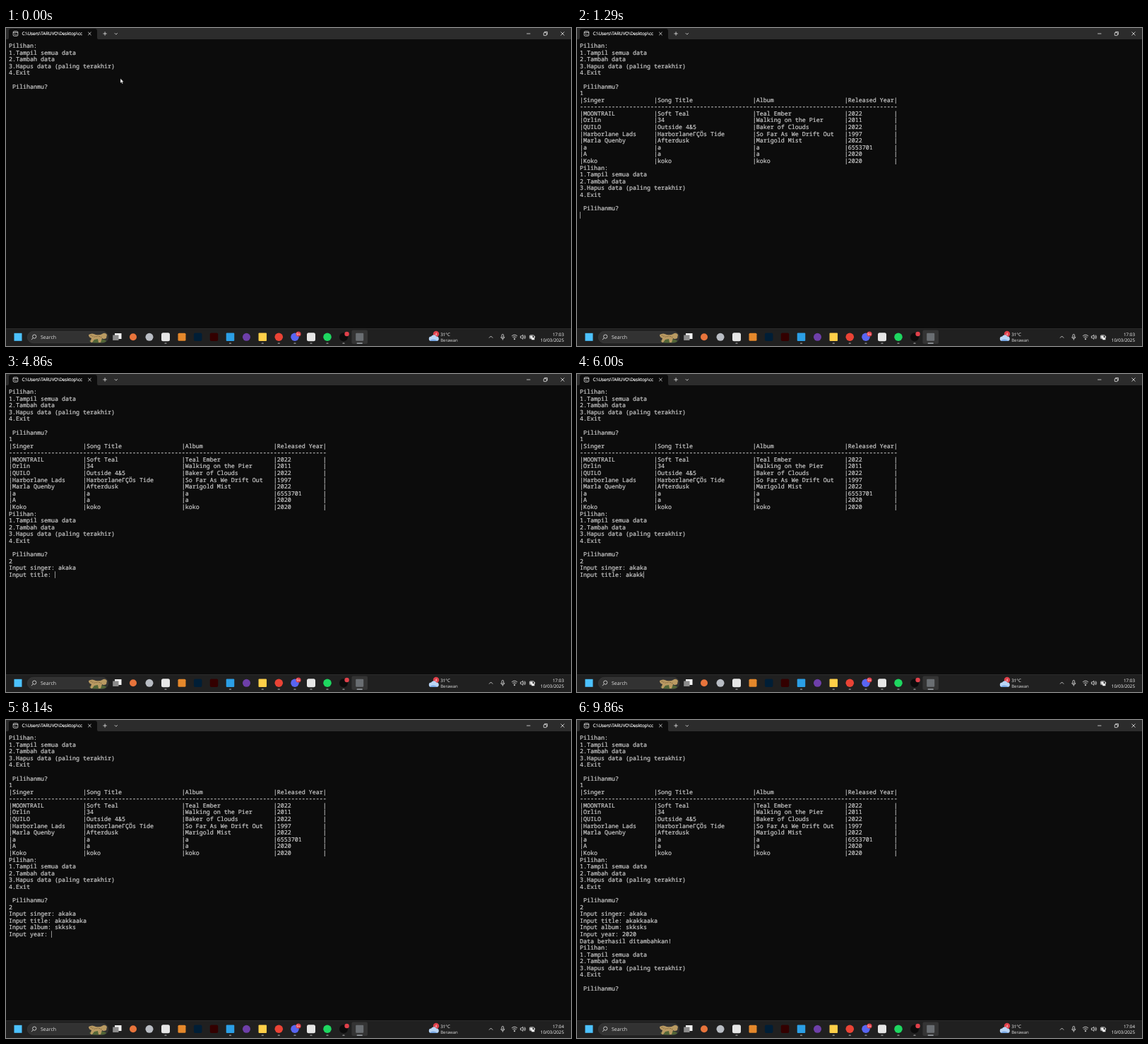
An HTML page that plays this animation: 800 by 450 pixels, repeating every 10000 ms.

```html
<!DOCTYPE html>
<html lang="id">
<head>
<meta charset="utf-8">
<title>Terminal</title>
<style>
  html, body { margin: 0; width: 100%; height: 100%; overflow: hidden; background: #0c0c0c; }
  svg { display: block; width: 800px; height: 450px; }
  text { white-space: pre; text-rendering: geometricPrecision; }
  #rows { font: 8.3333px "Noto Sans Mono", monospace; fill: #cccccc; stroke: #cccccc; stroke-width: .2; }
  .ui { font: 6.25px "Open Sans", "Noto Sans", sans-serif; fill: #fff; }
  .title { stroke: #fff; stroke-width: .15; }
  .line { fill: none; stroke: #fff; stroke-width: .7; }
</style>
</head>
<body>
<svg id="stage" viewBox="0 0 800 450">
  <defs>
    <clipPath id="tabClip"><rect x="20" width="89.3" height="16"/></clipPath>
    <clipPath id="photoClip"><rect x="116" y="429.5" width="28.5" height="16" rx="8"/></clipPath>
  </defs>
  <rect width="800" height="450" fill="#0c0c0c"/>

  <!-- Title bar -->
  <rect width="800" height="16" fill="#2c2c2c"/>
  <path d="M2 16q2 0 2-2V4q0-3 3-3H126q3 0 3 3V14q0 2 2 2z" fill="#0c0c0c"/>
  <rect class="line" x="10.2" y="4.7" width="6.6" height="6.6" rx="1.3"/>
  <path class="line" d="M10.2 6.4h6.6M12 8l1 .8-1 .8M13.8 9.7h1.6"/>
  <text class="ui title" x="22.5" y="10.3" clip-path="url(#tabClip)">C:\Users\TARUVO\Desktop\cc</text>
  <path class="line" d="M116.2 5.8l4.4 4.4m0-4.4l-4.4 4.4M137.4 8h5.4m-2.7-2.7v5.4M153.8 7.2l2 2 2-2
    M737.2 8h5.2M785.5 5.5l5 5m0-5l-5 5M762.6 6.2v-.8h3.8v3.8h-.8"/>
  <rect class="line" x="761.3" y="6.6" width="4" height="4" rx=".6"/>

  <g id="rows"></g>
  <rect id="caret" width=".7" height="9.6" fill="#ccc"/>
  <path id="pointer" d="M162 71.6v6.4l1.5-1.4 1 2.3 1.1-.5-1-2.2h2z" fill="#fff" stroke="#000" stroke-width=".3"/>

  <!-- Taskbar -->
  <rect y="425" width="800" height="25" fill="#202020"/>
  <rect y="425" width="800" height=".6" fill="#333"/>
  <rect x="30.3" y="429.3" width="114.4" height="16.4" rx="8.2" fill="#323232" stroke="#414141" stroke-width=".6"/>
  <circle class="line" cx="40.2" cy="436.6" r="2.6"/>
  <path class="line" d="M38.3 438.6l-2.3 2.6"/>
  <text class="ui" x="49" y="440" style="font-size:7px;fill:#ddd">Search</text>
  <g clip-path="url(#photoClip)">
    <ellipse cx="130" cy="443" rx="12" ry="3" fill="#526637"/>
    <path d="M117 434q5-3 10 0 6 1 9-1 4-3 7 1l-1 5q-4 2-6 0l-2 6h-3l-1-5-5 1-3 4h-3l2-6q-4-1-4-5z" fill="#b99a62"/>
    <path d="M120 435l5 2 6-1 5 2" fill="none" stroke="#6f5434" stroke-width="1.2" stroke-dasharray="1 1.5"/>
  </g>
  <rect x="154" y="432" width="9.5" height="8" fill="#f2f2f2"/>
  <rect x="151.2" y="434.5" width="8.3" height="7.5" fill="#8c8c8c"/>
  <rect x="489.5" y="427.5" width="22.5" height="19.5" rx="2" fill="#343434"/>
  <g id="icons"></g>
  <g id="badges" text-anchor="middle"></g>

  <!-- Weather and tray -->
  <path d="M602 443a3.2 3.2 0 0 1 0-6.4 4 4 0 0 1 7.3-.2 3.3 3.3 0 0 1 .4 6.6z" fill="#b9d5f5"/>
  <path d="M600 442.6q4-4 11 0l-1.5.4h-8z" fill="#79a8e4"/>
  <text class="ui" x="615.2" y="435.7">31°C</text>
  <text class="ui" x="615.2" y="443.8" style="font-size:6px;fill:#ddd">Berawan</text>
  <path class="line" d="M684 438.6l2.6-2.6 2.6 2.6"/>
  <rect class="line" x="702" y="433.4" width="2.6" height="4.8" rx="1.3"/>
  <path class="line" d="M700.7 437q.2 2.6 2.6 2.6t2.6-2.6M703.3 439.6v2"/>
  <path class="line" d="M716 436q4-3.6 8 0M717.4 437.7q2.6-2.3 5.2 0M718.8 439.3q1.2-1 2.4 0"/>
  <circle cx="720" cy="440.5" r=".8" fill="#fff"/>
  <path class="line" d="M728.4 436h1.5l2-1.8v6.2l-2-1.8h-1.5zM733.3 435.7q1.2 1.6 0 3.3M734.5 434.5q2.2 2.8 0 5.6"/>
  <rect class="line" x="741.4" y="434.8" width="6.4" height="4.8" rx="1"/>
  <path d="M742.2 435.6h3.5v3.2h-3.5zM748.2 436.3h.9v1.8h-.9zM744.3 438.2h4v3h-4z" fill="#fff"/>
  <text class="ui" id="clock" x="790" y="435.5" text-anchor="end"></text>
  <text class="ui" x="790" y="443.7" text-anchor="end">10/03/2025</text>
</svg>

<script>
const LOOP = 10000, BLINK = 570, CELL = 5, LINE = 9.58, LEFT = 4, TOP = 20.6;
const byId = id => document.getElementById(id);

function add(parent, tag, attrs, text = '') {
  const el = document.createElementNS('http://www.w3.org/2000/svg', tag);
  for (const key in attrs) el.setAttribute(key, attrs[key]);
  el.textContent = text;
  byId(parent).append(el);
  return el;
}

// Plain taskbar icons: [centre x, size, colour, corner radius, running]
[
  [17, 11, '#4cc2ff', 0], [180, 10, '#e8743b', 5], [203, 11, '#b9bdc4', 5.5],
  [226, 12, '#e6e6e6', 2.5, 1], [249, 11, '#e5882b', 1.5], [271.7, 11.5, '#001e36', 2],
  [294.5, 11.5, '#330000', 2], [317.5, 11.5, '#2b9fe6', 1, 1], [340.5, 11, '#6e3fa9', 5.5],
  [363.3, 11.5, '#ffcf48', 1, 1], [386.3, 11.5, '#ea4335', 5.75, 1], [409, 11.5, '#5865f2', 5.75, 1],
  [432, 12, '#e6e6e6', 2.5, 1], [455, 11.5, '#1ed760', 5.75, 1], [478, 12, '#0b0b0b', 6, 1],
  [500.7, 11, '#6a6e72', 1]
].forEach(([x, size, fill, rx, running]) => {
  add('icons', 'rect', { x: x - size / 2, y: 437.3 - size / 2, width: size, height: size, rx, fill });
  if (running) add('icons', 'rect', { x: x - 1.6, y: 445.6, width: 3.2, height: 1.2, rx: .6, fill: '#9a9a9a' });
});
add('icons', 'rect', { x: 496.5, y: 445.4, width: 8.4, height: 1.4, rx: .7, fill: '#b5bcc2' });

[[414, 3.6, '9+'], [482.6, 3.2, ''], [609, 4.2, '4']].forEach(([cx, r, label]) => {
  add('badges', 'circle', { cx, cy: 433, r, fill: '#e0404a' });
  add('badges', 'text', { class: 'ui', x: cx, y: 434.9, style: 'font-size:5px' }, label);
});

// Terminal session
const menu = `Pilihan:
1.Tampil semua data
2.Tambah data
3.Hapus data (paling terakhir)
4.Exit

 Pilihanmu?
`;
const widths = [20, 27, 25, 13];
const tableRow = cells => '|' + cells.split(',').map((cell, i) => cell.padEnd(widths[i]) + '|').join('') + '\n';
const table = tableRow('Singer,Song Title,Album,Released Year') + '-'.repeat(90) + '\n' + [
  'MOONTRAIL,Soft Teal,Teal Ember,2022',
  'Orlin,34,Walking on the Pier,2011',
  'QUILO,Outside 4&5,Baker of Clouds,2022',
  'Harborlane Lads,HarborlaneΓÇÖs Tide,So Far As We Drift Out,1997',
  'Marla Quenby,Afterdusk,Marigold Mist,2022',
  'a,a,a,6553701',
  'A,a,a,2020',
  'Koko,koko,koko,2020'
].map(tableRow).join('');

const typed = (text, start, step) => [...text].map((char, i) => [start + i * step, char]);
const session = [
  [1000, '1'],
  [1290, '\n' + table + menu],
  [2860, '2'],
  [3290, '\nInput singer: '],
  ...typed('akaka', 3860, 142),
  [4860, '\nInput title: '],
  ...typed('akakkaaka', 5430, 125),
  [6570, '\nInput album: '],
  ...typed('skksks', 7140, 143),
  [8000, '\nInput year: '],
  ...typed('2020', 8430, 142),
  [9140, '\nData berhasil ditambahkan!\n' + menu]
];

const rows = Array.from({ length: 40 }, (_, i) =>
  add('rows', 'text', { x: LEFT, y: TOP + 7.5 + i * LINE }));
let shown = '';

function render(t) {
  let output = menu;
  let lastInput = session.at(-1)[0] - LOOP;
  for (const [time, text] of session) {
    if (time > t) break;
    output += text;
    lastInput = time;
  }
  const lines = output.split('\n');
  if (output !== shown) {
    rows.forEach((row, i) => row.textContent = lines[i] || '');
    shown = output;
  }
  const caret = byId('caret');
  caret.setAttribute('x', LEFT + lines.at(-1).length * CELL);
  caret.setAttribute('y', TOP + (lines.length - 1) * LINE);
  // Each input restarts the blink in its visible half
  caret.style.opacity = Math.floor((t - lastInput) / BLINK) % 2 ? 0 : 1;
  byId('pointer').style.opacity = t < 140 ? 1 : 0;
  byId('clock').textContent = t < 7570 ? '17:03' : '17:04';
}

const start = performance.now();
function tick() {
  render((performance.now() - start) % LOOP);
  requestAnimationFrame(tick);
}
tick();
</script>
</body>
</html>
```
